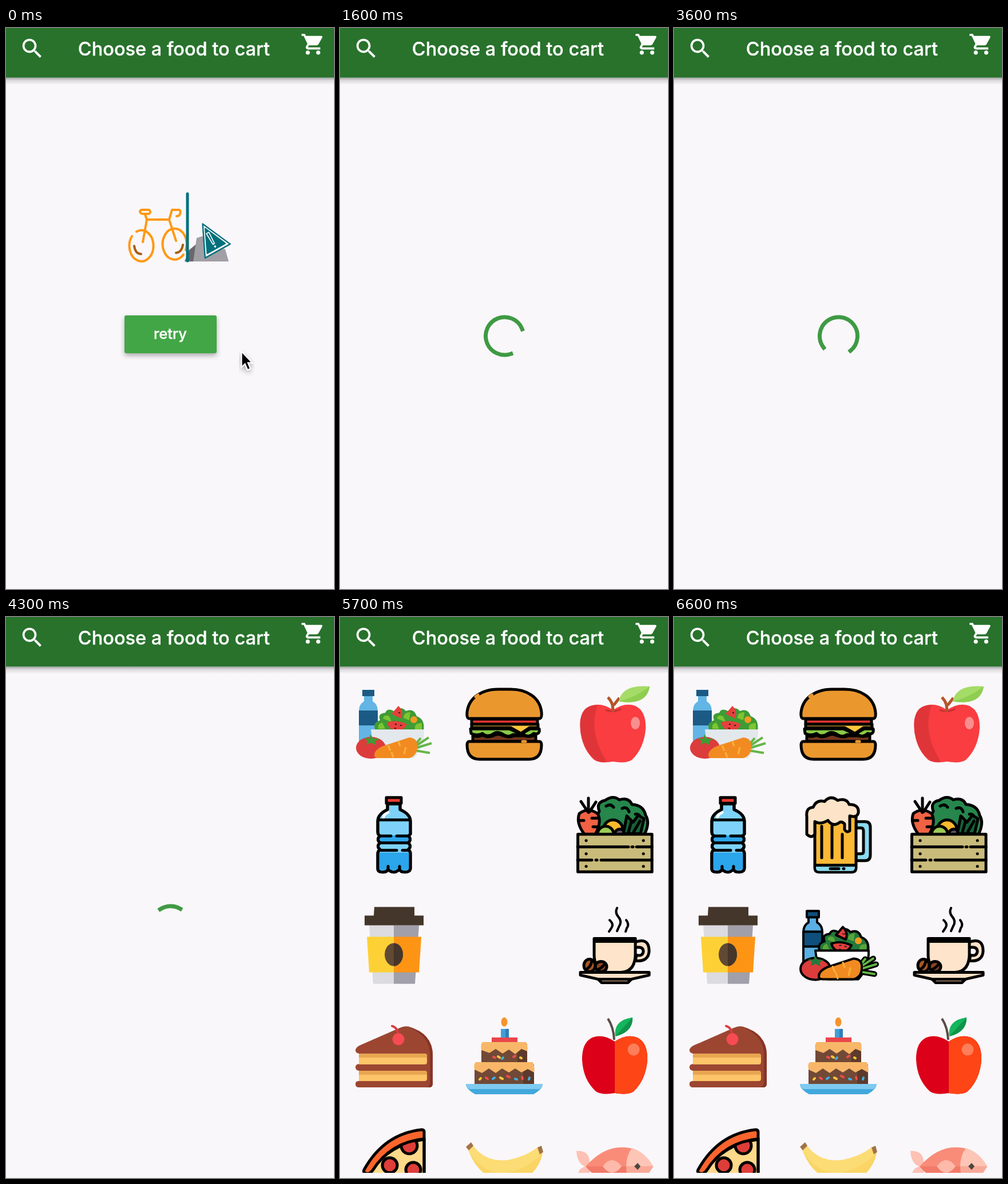
Write an HTML page that moves like this. It is 573 px wide and 978 px high and loops after 6.7 s.

```html
<!DOCTYPE html>
<html lang="en">
<head>
<meta charset="utf-8">
<title>Food cart</title>
<style>
html, body { margin: 0; width: 100%; height: 100%; overflow: hidden; background: #f9f7fa; }
svg { display: block; width: 573px; height: 978px; }
text { font-family: Inter, Roboto, sans-serif; font-weight: 500; fill: #fff; stroke: #fff; stroke-width: .4; text-anchor: middle; }
.k { stroke: #000; stroke-width: 5; stroke-linejoin: round; stroke-linecap: round; }
.n { fill: none; }
.plain { --leaf: #3f9b35; --leaf2: #7cc531; --bowl: #e3e8ed; --water: #62b5e5; --label: #1b5a84; --edge: none; }
.dark { --leaf: #23793a; --leaf2: #58a53a; --bowl: #fff; --water: #5ab0e4; --label: #0f4f7c; --edge: #000; stroke-width: 4; }
</style>
</head>
<body>
<svg viewBox="0 0 573 978">
<defs>
  <clipPath id="view"><path d="M0 87H573V969H0z"/></clipPath>
  <linearGradient id="shade" x2="0" y2="1">
    <stop stop-color="#000" stop-opacity=".34"/><stop offset=".4" stop-color="#000" stop-opacity=".12"/><stop offset="1" stop-color="#000" stop-opacity="0"/>
  </linearGradient>
  <filter id="soft" x="-20%" y="-30%" width="140%" height="180%"><feDropShadow dx="0" dy="4" stdDeviation="4" flood-opacity=".32"/></filter>
  <clipPath id="right"><path d="M67 0H140V140H67z"/></clipPath>
  <path id="greens" d="M104 103L114 91M105 105L128 90M107 108L133 100M106 113L130 117"/>
  <g id="salad">
    <path d="M15 17H30V27Q39 32 39 44V98H6V44Q6 32 15 27z" fill="var(--water)"/>
    <path d="M12 7H33V18H12zM6 43H39V69H6z" fill="var(--label)"/>
    <path d="M35 78Q29 64 43 60Q38 48 52 47Q56 38 67 44Q80 34 88 44Q102 38 107 53Q122 58 119 78z" fill="var(--leaf)"/>
    <path d="M40 75Q38 66 47 64L52 75zM48 57Q50 49 59 53L63 63zM84 56Q84 46 96 46L94 60zM104 76Q102 64 116 65V76z" fill="var(--leaf2)" stroke="none"/>
    <path d="M63 49L75 35Q85 44 80 57zM55 64Q71 58 90 67Q84 80 70 78Q58 76 55 64z" fill="#e5403d"/>
    <circle cx="102" cy="59" r="6" fill="#f49a21" stroke="none"/>
    <path d="M69 67h3m6 2h3m-13 5h3m4-27h3" stroke="#35191a" stroke-width="2"/>
    <path d="M27 76H120V82Q119 107 102 126H48Q30 108 27 76z" fill="var(--bowl)"/>
    <ellipse cx="27" cy="108" rx="26" ry="19" fill="#dc3c3c"/>
    <path d="M14 91L24 92L26 85L31 92L42 92L34 97L36 104L27 99L19 103L21 96z" fill="var(--leaf)" stroke="none"/>
    <use href="#greens" stroke="var(--edge)" stroke-width="10"/>
    <use href="#greens" stroke="#65b647" stroke-width="4"/>
    <path d="M33 122Q32 112 48 105L94 90Q109 91 108 106Q108 122 94 126H40Q34 126 33 122z" fill="#f18b21"/>
    <path d="M57 104l4 9m14-16l3 8m10 2l-3 12m-22-3l3 9" stroke="#fbb13b" stroke-width="3" fill="none"/>
  </g>
  <path id="apple" d="M67 42Q88 28 106 35Q125 44 124 75Q121 109 100 129Q90 136 67 132Q44 136 34 129Q12 109 10 75Q9 44 28 35Q46 28 67 42z"/>
</defs>

<g id="error">
  <g id="bike" fill="none" stroke="#ff9811" stroke-width="4" stroke-linecap="round" stroke-linejoin="round">
    <path d="M228 355A21 27 0 1 1 220 363M310 395A21 27 0 1 1 314 387"/>
    <path d="M236 317H250Q254 321 250 324H238Q231 321 236 317zM243 325L246 334L239 373M246 334H285M297 371L285 334L290 317H302Q306 318 304 324Q303 328 298 328"/>
    <path d="M224 380Q226 394 236 394M309 378Q307 391 297 392" stroke="#a75f13"/>
  </g>
  <path d="M312 407L320 387L332 377L329 407z" fill="#69676c"/>
  <path d="M327 407L333 366L356 359L366 375L383 386L389 407z" fill="#a19ea5"/>
  <path d="M356 359L366 375L349 387z" fill="#77757a"/>
  <path d="M349 387L366 375L383 386z" fill="#bebcc0"/>
  <path d="M317 289V406" stroke="#00707d" stroke-width="5" stroke-linecap="round"/>
  <g id="sign" stroke-linejoin="round">
    <path d="M0-36L25 18H-25z" fill="#fff" stroke="#00707d" stroke-width="2.4"/>
    <path d="M0-27L18 13H-18z" fill="#00707d" stroke="#00707d" stroke-width="2"/>
    <path d="M-2.5-18H2.5L1.5 4H-1.5z" fill="#00707d" stroke="#fff" stroke-width="1.6"/>
    <circle cy="9" r="1.8" fill="#fff"/>
  </g>
  <rect x="207" y="501" width="161" height="66" rx="3" fill="#43a647" filter="url(#soft)"/>
  <text x="287" y="542" font-size="25.6">retry</text>
  <path id="cursor" d="M0 0V27L6 21.5L10.5 32L15.5 30L11 19.5H18.5z" stroke="#fff" stroke-width="2" filter="url(#soft)"/>
</g>

<path id="spinner" fill="none" stroke="#3f9a43" stroke-width="7" stroke-linecap="square"/>

<g clip-path="url(#view)"><g id="foods">
  <use href="#salad" class="plain"/>

  <g class="k">
    <path d="M9 97H126V102H9z" fill="#e9962d" stroke="none"/>
    <path d="M10 58H125V67H10z" fill="#dc362f"/>
    <path d="M10 67H126V73H111L96 83L78 73H10z" fill="#fdc63b"/>
    <path d="M8 75H76L96 84L112 75H128Q130 86 118 83Q110 91 101 85H82Q75 91 64 84Q54 78 46 85Q36 90 29 83Q19 88 9 83z" fill="#8aca45"/>
    <path d="M12 87Q20 90 29 86Q37 91 48 87Q56 82 65 87Q76 91 84 87H102Q112 90 122 86V97H12z" fill="#75351d"/>
    <path d="M5 57Q1 56 2 46C5 19 30 6 56 6H78C105 6 129 19 132 46Q133 56 129 57z" fill="#ea982e"/>
    <path d="M5 97H129Q132 98 132 103Q132 128 110 128H24Q2 128 2 103Q2 98 5 97z" fill="#ea982e"/>
    <path d="M17 19L21 16" stroke="#ea982e"/>
    <path d="M99 97H104" stroke="#e9962d"/>
  </g>

  <g>
    <use href="#apple" x="-3" fill="#f93d40"/>
    <path d="M37 34Q20 80 53 132Q35 137 20 115Q3 88 7 58Q12 32 37 34z" fill="#df3539"/>
    <path d="M51 42Q64 48 78 40" fill="none" stroke="#c62f34" stroke-width="3"/>
    <path d="M63 46Q66 31 55 20M65 34L75 21" fill="none" stroke="#b5542b" stroke-width="5"/>
    <path d="M74 27Q80-3 128 1Q123 35 74 27z" fill="#a4dc67"/>
    <path d="M74 27Q100 22 128 1Q123 35 74 27z" fill="#8fce51"/>
    <ellipse cx="103" cy="65" rx="8" ry="11" fill="#f88e8e"/>
  </g>

  <g class="k">
    <path id="flask" d="M56 13H78V23Q96 31 96 43V62Q97 67 92 69Q99 75 92 81Q99 87 92 93Q96 95 96 100V126Q95 132 87 132Q78 132 77 127Q72 132 67 132Q61 132 57 127Q55 132 48 132Q39 132 39 126V100Q39 95 43 93Q36 87 43 81Q36 75 43 69Q39 67 39 62V43Q39 31 56 23z" fill="#7ed2fa"/>
    <path d="M41 68H94L92 80H43zM41 98H94V126Q87 132 78 126Q67 132 57 126Q48 132 41 126z" fill="#2ba5eb" stroke="none"/>
    <path d="M54 2H80V12H54z" fill="#ea3c31"/>
    <path d="M40 41H95M44 69H62M72 69H92M44 81H92M44 94H72M82 94H92M57 126V122M77 126V122" class="n"/>
    <path d="M49 36Q50 31 57 28" stroke="#fff" class="n"/>
    <use href="#flask" style="fill-opacity:0"/>
  </g>

  <g class="k">
    <path d="M98 44H114Q123 44 123 54V102Q123 112 114 112H98V100H107Q111 100 111 96V60Q111 55 107 55H98z" fill="#8adbf0"/>
    <path d="M26 33H98V124Q98 132 90 132H34Q26 132 26 124z" fill="#fbb936"/>
    <path d="M28 121H96V125Q95 130 90 130H34Q28 130 28 125z" fill="#8adbf0" stroke="none"/>
    <path d="M27 120H97M38 52V107M56 52V107M74 66V107M53 126H68M76 126H77" class="n"/>
    <path d="M26 44V66Q20 74 12 66V35Q10 20 23 19Q29 5 43 9Q53-3 66 7Q81 2 86 14Q104 14 102 29Q99 38 87 34V60Q82 64 78 58V48Q72 42 67 47Q57 53 49 42Q35 50 26 44z" fill="#fde3c7"/>
  </g>

  <g class="k">
    <path d="M46 66Q29 44 40 26Q34 10 50 7Q64-3 75 6Q91 1 97 14Q117 15 121 33Q129 46 119 66z" fill="#26864c"/>
    <path d="M52 17q8-5 13 2m15 2q9-4 12 6M103 31q8-1 9 8" class="n"/>
    <path d="M5 30Q20 18 37 30Q45 44 33 66H14Q-1 47 5 30z" fill="#f06243"/>
    <path d="M21 28V3M20 27L8 9M23 27L34 10M5 42H13M27 38H37M29 53H37" class="n"/>
    <circle cx="64" cy="58" r="17" fill="#fcb92e"/><circle cx="51" cy="66" r="14" fill="#9dca54"/><circle cx="76" cy="66" r="9" fill="#5b5365"/>
    <path d="M82 65L88 34L99 45L108 33L118 39L112 65z" fill="#176138"/>
    <path d="M91 62L96 44M100 62L111 43" class="n"/>
    <path d="M2.5 66H132V131.500H2.500z" fill="#c9bb7a"/>
    <path d="M2 88H91M97 88H99M105 88H132M2 111H27M34 111H36M43 111H132M17 77h.1M117 77h.1M17 100h.1M117 100h.1M17 122h.1M117 122h.1" class="n"/>
  </g>

  <g>
    <path d="M24 32H67V134H31z" fill="#dcdbe0"/><path d="M67 32H111L104 134H67z" fill="#a19fa9"/>
    <path d="M20 52H67V114H24z" fill="#fdd136"/><path d="M67 52H115L111 114H67z" fill="#fd9414"/>
    <ellipse cx="67" cy="83" rx="16" ry="20" fill="#614934"/><ellipse cx="67" cy="83" rx="16" ry="20" fill="#44362a" clip-path="url(#right)"/>
    <path d="M33 0H103V15H119V32H16V15H32z" fill="#44362a"/>
  </g>

  <use href="#salad" class="k dark"/>

  <g class="k">
    <path d="M58 23Q66 30 61 37L57 43M71 2Q67 10 73 17Q80 25 75 33L71 42M87 23Q93 31 88 37L86 43" class="n" stroke-width="4"/>
    <path d="M101 62Q127 52 127 77Q126 96 103 94L105 84Q116 87 117 77Q116 68 102 71z" fill="#fbe1c7"/>
    <path d="M31 55H103V84Q102 113 78 114H54Q31 108 31 84z" fill="#fde4ca"/>
    <path d="M34 60H100" class="n"/>
    <path d="M7 114H127V119L96 126H38L7 119z" fill="#fbe1c7"/>
    <path d="M38 126H96L90 132H44z" fill="#f3caa5"/>
    <ellipse cx="23" cy="102" rx="10" ry="11" fill="#a45627"/><ellipse cx="43" cy="104" rx="10" ry="9" fill="#8d4420"/>
    <path d="M17 109Q26 104 27 93M36 110Q44 107 50 99" class="n"/>
  </g>

  <g>
    <path d="M0 57Q1 52 7 49L78 18Q86 14 93 16Q135 28 135 66V117Q134 122 129 122H6Q0 122 0 116Q0 111 6 111V93Q0 92 0 87Q0 82 6 81V63Q0 62 0 57z" fill="#9c4632"/>
    <path d="M90 16Q135 28 135 66V117Q134 122 129 122H124Q130 121 130 113V62Q128 30 90 16z" fill="#873425"/>
    <path d="M6 63H121Q125 63 125 67V78Q125 82 121 82H6zM6 93H121Q125 93 125 97V107Q125 111 121 111H6z" fill="#fdc469"/>
    <path d="M6 63H121Q125 63 125 70H6zM6 93H121Q125 93 125 100H6z" fill="#e8a551"/>
    <path d="M64 15Q73 17 75 30" fill="none" stroke="#d93d42" stroke-width="4" stroke-linecap="round"/>
    <circle cx="75" cy="38" r="10.5" fill="#f64b50"/>
  </g>

  <g>
    <path d="M0 116H134Q134 125 118 134H16Q0 125 0 116z" fill="#42a8dd"/><path d="M0 116H134Q134 122 128 125H6Q0 122 0 116z" fill="#7fcaf0"/>
    <path d="M15 82H119V116H15zM27 46H107V78H27z" fill="#714936"/>
    <path d="M100 82H119V116H100zM90 46H107V78H90z" fill="#5d3a2b"/>
    <path d="M17 78H117Q121 88 119 96L108 90L97 96L86 89L75 96L63 89L52 97L40 89L28 97L15 91Q13 82 17 78zM29 43H105Q109 50 107 59L97 55L86 64L75 56L64 63L52 55L41 62L27 57Q25 48 29 43z" fill="#f8b768"/>
    <path d="M45 35H90V43H45z" fill="#e9464b"/>
    <path d="M61 20H75V35H61z" fill="#429fd8"/><path d="M69 20H75V35H69z" fill="#317fb9"/>
    <ellipse cx="67" cy="8" rx="5.5" ry="8" fill="#f6942e"/>
    <g fill="none" stroke-width="4" stroke-linecap="round">
      <path d="M35 105l3 2M72 102l4 2M98 104l1 3M48 69l3 1M83 69l3-2" stroke="#ee4c50"/>
      <path d="M47 107l3-2M86 107l3 1M110 108l1-3M63 72l2-2" stroke="#39b1e4"/>
      <path d="M24 108l2-2M60 105l4 2M56 68l3 2M95 70l2 1" stroke="#fbc63d"/>
    </g>
  </g>

  <g>
    <use href="#apple" fill="#dd0019"/><use href="#apple" fill="#fd4515" clip-path="url(#right)"/>
    <circle cx="100" cy="56" r="10.5" fill="#fd7e5a"/>
    <path d="M55 2Q65 17 66 39" fill="none" stroke="#594b44" stroke-width="4"/>
    <path d="M68 33Q64 5 98 0Q99 25 68 33z" fill="#13b65d"/><path d="M68 33L98 0Q99 25 68 33z" fill="#0f944b"/>
  </g>

  <g class="k">
    <path d="M24 80Q57 28 120 20V134z" fill="#fdd98a"/>
    <circle cx="94" cy="31" r="14" fill="#de3d39"/><circle cx="60" cy="65" r="13" fill="#de3d39"/><circle cx="101" cy="73" r="13" fill="#de3d39"/>
    <path d="M15 73Q50 10 116 3Q120 3 120 7V19Q61 25 30 74Q24 82 18 79Q13 77 15 73z" fill="#fb652d"/>
    <path d="M120 18V100" class="n"/>
  </g>

  <g>
    <path d="M2 34L10 27Q31 60 73 56Q104 50 125 34L134 44Q124 88 78 96Q26 92 6 43z" fill="#fcdc74"/>
    <path d="M6 43Q29 78 67 79Q103 74 134 44Q124 88 78 96Q26 92 6 43z" fill="#fad566"/>
    <path d="M0 33L9 25L13 31L5 39zM125 34L132 31L135 42L129 46z" fill="#a37347"/>
  </g>

  <g>
    <path d="M0 40Q23 39 23 60L17 68Q1 63 0 40zM0 94Q1 68 18 67L24 75Q22 94 0 94z" fill="#fdc2b4"/>
    <path d="M16 67Q49 30 86 34Q116 36 134 67Q116 98 86 100Q49 104 16 67z" fill="#f98c79"/>
    <path d="M16 67H134Q116 98 86 100Q49 104 16 67z" fill="#f17a68"/>
    <path d="M97 35Q121 43 134 67H87Q87 48 97 35z" fill="#fdc5b6"/><path d="M87 67H134Q121 91 97 99Q87 86 87 67z" fill="#f8a998"/>
    <path d="M46 67Q62 45 79 67Q62 89 46 67z" fill="#fdb9a9"/>
    <path d="M101 67L107 61L112 67L107 73z" fill="#4d473f"/>
  </g>
</g></g>

<path d="M0 86.500H573V99H0z" fill="url(#shade)"/>
<path d="M0 0H573V86.500H0z" fill="#28722c"/>
<g fill="#fff">
  <path transform="translate(23 13) scale(1.9)" d="M15.5 14h-.79l-.28-.27C15.41 12.59 16 11.11 16 9.5 16 5.91 13.09 3 9.5 3S3 5.91 3 9.5 5.91 16 9.5 16c1.61 0 3.09-.59 4.23-1.57l.27.28v.79l5 4.99L20.49 19l-4.99-5zm-6 0C7.01 14 5 11.99 5 9.5S7.01 5 9.5 5 14 7.01 14 9.5 11.99 14 9.5 14z"/>
  <path transform="translate(514.5 6.5) scale(1.82)" d="M7 18c-1.1 0-2 .9-2 2s.9 2 2 2 2-.9 2-2-.9-2-2-2zM1 2v2h2l3.6 7.59-1.35 2.45c-.16.28-.25.61-.25.96 0 1.1.9 2 2 2h12v-2H7.42c-.14 0-.25-.11-.25-.25l.03-.12.9-1.63h7.45c.75 0 1.41-.41 1.75-1.03l3.58-6.49c.08-.14.12-.31.12-.48 0-.55-.45-1-1-1H5.21l-.94-2H1zm16 16c-1.1 0-2 .9-2 2s.9 2 2 2 2-.9 2-2-.9-2-2-2z"/>
</g>
<text x="293.5" y="48" font-size="32.5">Choose a food to cart</text>
</svg>

<script>
const LOOP = 6700, STEP = 100, CLICK = 1100, LOADED = 5100;
// When each picture of the grid has loaded, row by row
const ready = [5500, 5600, 5400, 5700, 5800, 5600, 5500, 6000, 5700, 5100, 5300, 5200, 5400, 5200, 5100];
const el = id => document.getElementById(id);
const [error, bike, sign, cursor, spinner] = ['error', 'bike', 'sign', 'cursor', 'spinner'].map(el);
const foods = [...el('foods').children];
const clamp = x => Math.min(1, Math.max(0, x));
const smooth = x => x * x * (3 - 2 * x);
const show = (node, on) => node.setAttribute('display', on ? 'inline' : 'none');
const move = (node, x, y, turn = 0) => node.setAttribute('transform', `translate(${x} ${y}) rotate(${turn})`);

foods.forEach((food, i) => move(food, 27 + 193 * (i % 3), 120 + 192.7 * Math.floor(i / 3)));

// cubic-bezier(.4, 0, .2, 1)
function ease(x) {
  let lo = 0, hi = 1;
  for (let i = 0; i < 20; i++) {
    const u = (lo + hi) / 2, v = 1 - u;
    if (1.2 * v * v * u + 0.6 * v * u * u + u * u * u < x) lo = u; else hi = u;
  }
  return lo * lo * (3 - 2 * lo);
}

function drawError(t) {
  const back = clamp(t / 700), fallen = t < 700;
  move(bike, -59 * smooth(back), 0);
  bike.setAttribute('opacity', clamp((700 - t) / 300));
  fallen ? move(sign, 361, 373, -29) : move(sign, 317.7, 267);
  const k = smooth(clamp((t - 100) / 600));
  move(cursor, 411.5 - 61 * k, 564 - 20 * k);
}

function drawSpinner(t) {
  // The app stalls while it builds the list
  const time = t < 4200 ? t - 1080 : 3120 + 17 * clamp((t - 4200) / 300);
  const turn = Math.floor(time / 1000), p = time / 1000 - turn;
  const head = ease(clamp(p * 2)), tail = ease(clamp(p * 2 - 1));
  const from = -90 + 270 * tail + 306 * p - 144 * turn;
  const sweep = Math.max(270 * (head - tail), 0.5);
  const at = deg => {
    const a = deg * Math.PI / 180;
    return `${287.5 + 33 * Math.cos(a)} ${537 + 33 * Math.sin(a)}`;
  };
  spinner.setAttribute('d', `M${at(from)}A33 33 0 ${+(sweep > 180)} 1 ${at(from + sweep)}`);
}

function draw(now) {
  const t = Math.floor(now % LOOP / STEP) * STEP;
  show(error, t < CLICK);
  show(spinner, t >= CLICK && t < LOADED);
  foods.forEach((food, i) => show(food, t >= ready[i]));
  if (t < CLICK) drawError(t);
  else if (t < LOADED) drawSpinner(t);
}

let start;
function tick(now) {
  start ??= now;
  draw(now - start);
  requestAnimationFrame(tick);
}
draw(0);
requestAnimationFrame(tick);
</script>
</body>
</html>
```
